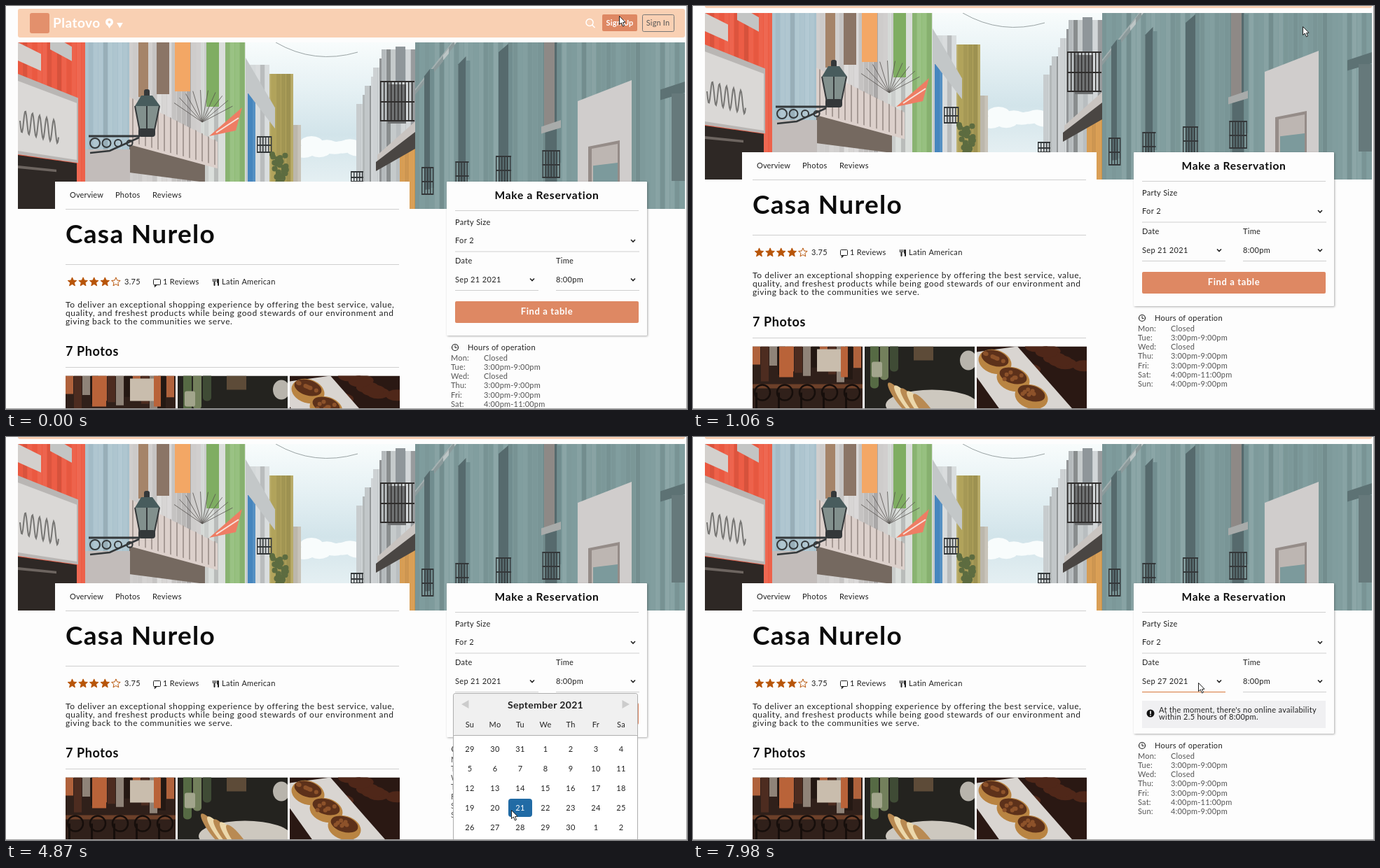
An HTML page with a canvas for the animation above (8000 ms loop, 972x576 px).

```html
<!DOCTYPE html>
<html lang="en">
<head>
<meta charset="utf-8">
<title>Restaurant page</title>
<style>
html, body { margin: 0; width: 100%; height: 100%; overflow: hidden; background: #fdfdfd; }
canvas { display: block; }
</style>
</head>
<body>
<canvas id="stage" width="972" height="576"></canvas>
<script>
const ctx = document.getElementById('stage').getContext('2d');
const LOOP = 8000;
const ORANGE = '#de8863', HOVER = '#d8783a', RULE = '#cfcfcf', INK = '#222', IRON = '#34383a';
const WHITE_BOLD = { weight: 700, color: '#fff', align: 'center' };

// ---------- helpers ----------
const noise = n => { const v = Math.sin(n * 12.9898) * 43758.5453; return v - Math.floor(v); };
const times = (n, f) => Array.from({ length: n }, (_, i) => f(i));

function rect(color, x, y, w, h, r = 0) {
  ctx.fillStyle = color;
  ctx.beginPath();
  ctx.roundRect(x, y, w, h, r);
  ctx.fill();
}

function frame(color, x, y, w, h, r) {
  ctx.strokeStyle = color;
  ctx.lineWidth = 1;
  ctx.beginPath();
  ctx.roundRect(x, y, w, h, r);
  ctx.stroke();
}

function trace(points) {
  ctx.beginPath();
  points.forEach(p => ctx.lineTo(...p));
}

function poly(color, ...points) {
  trace(points);
  ctx.fillStyle = color;
  ctx.fill();
}

function line(color, width, ...points) {
  trace(points);
  ctx.strokeStyle = color;
  ctx.lineWidth = width;
  ctx.stroke();
}

function disc(color, x, y, rx, ry = rx, turn = 0) {
  ctx.fillStyle = color;
  ctx.beginPath();
  ctx.ellipse(x, y, rx, ry, turn, 0, 7);
  ctx.fill();
}

function ring(color, x, y, r, width = 1) {
  ctx.strokeStyle = color;
  ctx.lineWidth = width;
  ctx.beginPath();
  ctx.arc(x, y, r, 0, 7);
  ctx.stroke();
}

function arrow(color, x, y, size, turn) {
  poly(color, ...times(3, i => {
    const a = turn + i * Math.PI * 2 / 3;
    return [x + size * Math.cos(a), y + size * Math.sin(a)];
  }));
}

function text(s, x, y, { size = 11, weight = 400, color = INK, gap = 0.3, align = 'left' } = {}) {
  ctx.font = `${weight} ${size}px Lato, "Open Sans", sans-serif`;
  ctx.letterSpacing = gap + 'px';
  ctx.textAlign = align;
  ctx.fillStyle = color;
  ctx.fillText(s, x, y);
}

const rule = (x1, x2, y, color = RULE) => rect(color, x1, y, x2 - x1, 1);
const chevron = (x, y) => line(INK, 1.6, [x - 3, y - 1.5], [x, y + 1.5], [x + 3, y - 1.5]);

function clipped(x, y, w, h, draw) {
  ctx.save();
  ctx.beginPath();
  ctx.rect(x, y, w, h);
  ctx.clip();
  draw();
  ctx.restore();
}

// ---------- motion ----------
// pointer moves: start, end, x, y, sideways bend
const MOVES = [
  [500, 800, 870, 29, 0],
  [1480, 2200, 706, 292, 0],
  [3510, 3750, 696, 357, 0],
  [4300, 4990, 697, 555, 70],
  [6090, 6780, 738, 388, 46],
  [7660, 7980, 721, 351, 0]
];

const progress = (t, from, to) => Math.min(1, Math.max(0, (t - from) / (to - from)));

function pointerAt(t) {
  const tip = { x: 875, y: 14 };
  for (const [from, to, x, y, bend] of MOVES) {
    const e = 1 - (1 - progress(t, from, to)) ** 1.25;
    tip.x += (x - tip.x) * e + bend * Math.sin(Math.PI * e);
    tip.y += (y - tip.y) * e;
  }
  return tip;
}

const scrollAt = t => Math.round(42 * (1 - (1 - progress(t, 490, 820)) ** 2));
const over = (p, x, y, w, h) => p.x >= x && p.x <= x + w && p.y >= y && p.y <= y + h;

// ---------- header ----------
function drawHeader() {
  rect('#f9d0b3', 17, 4, 952, 41, 3);
  rect('#e3906c', 34, 10, 28, 29, 3);
  text('Platovo', 67, 31, { size: 19, weight: 700, color: '#fff', gap: 0.5 });
  disc('#fff', 147.5, 23, 5.5);
  arrow('#fff', 147.5, 27, 5, Math.PI / 2);
  disc('#f9d0b3', 147.5, 23, 2);
  arrow('#fff', 162.5, 26.5, 5, Math.PI / 2);
  ring('#fff', 833, 23.5, 5, 1.5);
  line('#fff', 1.6, [836.5, 27], [840.5, 31]);
  rect(ORANGE, 851, 12, 50, 24, 2);
  text('Sign Up', 876, 28, { ...WHITE_BOLD, gap: 0.2 });
  frame('#777', 908.5, 12.5, 45, 24, 2);
  text('Sign In', 930.5, 28, { color: '#555', gap: 0.15, align: 'center' });
}

// ---------- street ----------
const TOP = 52, BASE = 290, VANISH = { x: 460, y: 275 };

// wall with faint vertical pilasters
function wall(color, x, w, top = TOP, grain = 0.16) {
  rect(color, x, top, w, BASE - top);
  for (let dx = 0; dx < w; dx += 7) {
    const n = noise(x + dx) - 0.5, shade = n > 0 ? '255,255,255' : '0,0,0';
    rect(`rgba(${shade},${Math.abs(n) * 2 * grain})`, x + dx, top, Math.min(6, w - dx), BASE - top);
  }
}

// band whose edges recede to the vanishing point
function slab(color, x1, x2, top, bottom) {
  const k = (x2 - VANISH.x) / (x1 - VANISH.x);
  const far = y => VANISH.y + (y - VANISH.y) * k;
  poly(color, [x1, top], [x2, far(top)], [x2, far(bottom)], [x1, bottom]);
}

function railing(x, y, w, h, color = IRON, step = 4) {
  for (let dx = 0; dx <= w; dx += step) rect(color, x + dx, y, 1.4, h);
  for (const dy of [0, h / 2, h - 2]) rect(color, x, y + dy, w, 2);
}

function drawSky() {
  const g = ctx.createLinearGradient(0, TOP, 0, 250);
  ['#f8fcfc', '#e6f1f4', '#d2e4ea', '#e4eff2'].forEach((c, i) => g.addColorStop(i / 3, c));
  rect(g, 340, TOP, 250, 200);
  times(9, i => disc('#f8fcfc', 425 + i * 11, 208 - noise(i) * 14, 16, 9));
  ctx.strokeStyle = '#9aa3a4';
  ctx.lineWidth = 1;
  ctx.beginPath();
  ctx.moveTo(385, TOP);
  ctx.quadraticCurveTo(440, 84, 502, 66);
  ctx.stroke();
}

function drawLeftStreet() {
  wall('#c4bfb4', 403, 18, 170);
  wall('#b2a45c', 372, 38, 97);
  wall('#d3d7d8', 342, 34, 84);
  wall('#4585bd', 345, 11, 125);
  slab('#c3c7c8', 342, 384, 74, 120);
  railing(358, 186, 20, 24);
  times(24, i => disc('#5d6c40', 380 + noise(i) * 20, 212 + i * 1.7, 4));

  wall('#d9ddda', 276, 66);
  wall('#8fbb76', 313, 28);
  rect('#7fad62', 286, TOP, 18, 92);
  wall('#d0cecd', 174, 104, TOP, 0.3);
  ['#a58469', '#8b7566', '#f3a765'].forEach((c, i) => rect(c, 189 + i * 26, TOP, 14 + i * 4, 78 - i * 4));

  slab('#756960', 176, 284, 194, 238);
  slab('#dcd0cb', 176, 302, 130, 198);
  for (let x = 180; x < 300; x += 9) slab('#a69a95', x, x + 2, 130 + (x - 176) * 0.5, 194 + (x - 176) * 0.27);
  times(10, i => {
    const a = -2.5 + i * 0.22;
    line('#56524f', 0.8, [280, 166], [280 + 50 * Math.cos(a), 166 + 46 * Math.sin(a)]);
  });

  wall('#a8c1cc', 111, 65);
  rect('#c2bcba', 111, 205, 66, 48);
  wall('#ec5a42', 17, 96, TOP, 0.1);
  slab('#d3d0cd', 17, 50, TOP, 78);
  slab('#c3c5c4', 63, 94, 40, 62);
  slab('#b9b6b4', 17, 103, 97, 212);
  slab('#dad8d6', 17, 101, 107, 207);
  slab('#2e2825', 17, 101, 213, BASE + 9);
  slab('#6d6560', 17, 72, 228, 232);
  trace(times(56, i => [20 + i, 164 + i * 0.3 + 16 * Math.sin(i * 0.62)]));
  ctx.strokeStyle = '#777674';
  ctx.lineWidth = 2;
  ctx.stroke();

  poly('#ee7d64', [290, 186], [337, 145], [328, 178]);
  line('#f6e4dd', 2, [300, 181], [332, 160]);
  drawLamp();
}

function drawLamp() {
  line(IRON, 3, [118, 186], [191, 186]);
  line(IRON, 2.5, [120, 210], [148, 207], [190, 188]);
  times(4, i => ring(IRON, 127 + i * 16.5, 196, 7 - i, 2));
  rect(IRON, 197, 119, 8, 12, 3);
  poly('#485c5d', [184, 143], [193, 128], [209, 128], [220, 143]);
  poly('#82908d', [184, 143], [219, 143], [212, 176], [190, 176]);
  for (const x of [184, 201, 219]) line(IRON, 2, [x, 143], [201 + (x - 201) * 0.6, 178]);
  rect(IRON, 189, 175, 24, 12, 4);
}

function drawRightStreet() {
  // ornate white house, stepping back towards the end of the street
  times(7, i => wall('#c3c8ca', 500 + i * 6 + (i % 2) * 3, 90 - i * 6, 140 - i * 13, 0.3));
  rect('#8f969a', 556, 58, 14, 50);
  wall('#dda257', 562, 22, 196);
  railing(492, 236, 18, 16);
  rect('#6f7172', 545, 112, 26, 56);
  railing(534, 107, 49, 58, '#2f2d2c', 5);
  slab('#c9c4c0', 584, 530, 165, 182);
  slab('#4a4643', 584, 528, 180, 204);

  wall('#7f9c9d', 584, 385, TOP, 0.1);
  times(4, i => slab(i % 2 ? '#8b9a9b' : '#bcc5c5', 648 - i * 8, 584, 38 + i * 11, 46 + i * 11));
  times(4, i => {
    const x = 597 + 44 * i + 4.5 * i * i, w = 8 + i * 3;
    slab('#566a6d', x + w, x, 90 - i * 18, 262);
    rect('#718d8f', x + w, 90 - i * 12, 6, 170);
    railing(x - 4, 230 - i * 8, w + 8, 40);
  });
  rect('#8e8986', 768, TOP, 15, 120);
  slab('#a8abaa', 792, 764, 163, 174);
  slab('#d0cdcc', 893, 816, 106, 262);
  slab('#958c88', 876, 831, 192, 264);
  slab('#bdb6b2', 873, 836, 197, 264);
  slab('#7c9a9c', 873, 838, 224, 264);
  slab('#5d7274', 969, 934, 108, 124);
  rect('#66797b', 950, 125, 19, 125);
}

// ---------- photos ----------
const PHOTO = { y: 528.5, w: 157, h: 100 };

function photo(x, base, draw) {
  clipped(x, PHOTO.y, PHOTO.w, PHOTO.h, () => {
    ctx.translate(x, PHOTO.y);
    rect(base, 0, 0, PHOTO.w, PHOTO.h);
    draw();
  });
}

function drawPhotos() {
  photo(85, '#30201a', () => {
    times(13, i => rect(['#b0623c', '#4d2c20', '#8f8378', '#241813'][i % 4], i * 12, 0, 11, 26 + noise(i) * 26));
    rect('#c9bdad', 92, 4, 34, 32);
    for (const x of [38, 48, 126]) rect('#b96339', x, 0, 10, 44);
    rect('#6d4029', 0, 54, PHOTO.w, 6);
    times(5, i => {
      ring('#160e0b', 14 + i * 32, 66, 11, 2.5);
      rect('#160e0b', 4 + i * 32, 66, 3, 34);
    });
  });
  photo(245, '#24231f', () => {
    times(3, i => rect(['#566a44', '#73805c', '#3f4b35'][i], 8 + i * 14, -4, 12, 64 - i * 12, 5));
    rect('#a2a58c', 10, 22, 15, 22, 3);
    rect('#5d4b38', 70, 0, 28, 20);
    disc('#cdc8bf', 96, 84, 66, 22);
    disc('#b8b4ac', 148, 20, 12, 14);
    times(5, i => disc(i % 2 ? '#ecd8ab' : '#b98a52', 52 + i * 9, 76 + i * 4, 7, 30, -0.65));
  });
  photo(405, '#2a1813', () => {
    times(10, i => disc('#4f2719', 70 + noise(i) * 90, noise(i + 20) * 50, 16, 8));
    poly('#d9d5d1', [0, 8], [58, 0], [146, 100], [40, 100], [0, 44]);
    times(3, i => {
      const x = 26 + i * 26, y = 18 + i * 25;
      disc('#b98442', x, y + 4, 24, 17, 0.3);
      disc('#5d311a', x, y - 1, 20, 11, 0.3);
      times(7, k => disc('#8d522a', x + (noise(k + i) - 0.5) * 28, y - 2 + (noise(k + 9 * i) - 0.5) * 12, 3));
    });
  });
}

// ---------- details ----------
function star(x, y, filled) {
  trace(times(10, i => {
    const a = -Math.PI / 2 + i * Math.PI / 5, r = i % 2 ? 3 : 6.6;
    return [x + r * Math.cos(a), y + r * Math.sin(a)];
  }));
  ctx.closePath();
  ctx.fillStyle = ctx.strokeStyle = '#b85509';
  ctx.lineWidth = 1;
  if (filled) ctx.fill();
  ctx.stroke();
}

function drawDetails() {
  rect('#fdfdfd', 70, 251, 506, 380);
  text('Overview', 91, 274, { gap: 0.15 });
  text('Photos', 156, 274);
  text('Reviews', 209, 274);
  text('Casa Nurelo', 85, 339, { size: 37, weight: 700, color: '#0c0c0c', gap: 1.3 });
  for (const y of [290, 369, 516]) rule(85, 561, y);

  times(5, i => star(94.5 + i * 15.6, 394.5, i < 4));
  text('3.75', 169, 398);
  frame(INK, 210.5, 390.5, 10, 8, 1);
  line(INK, 1.2, [212.5, 398], [212.5, 401], [215, 398.5]);
  text('1 Reviews', 224, 398);
  for (const x of [295, 297, 299]) rect(INK, x, 390, 1, 4);
  for (const x of [296.5, 302]) rect(INK, x, 393, 2, 7, 1);
  rect(INK, 301, 390, 3, 6, 1);
  text('Latin American', 308, 398);

  [
    'To deliver an exceptional shopping experience by offering the best service, value,',
    'quality, and freshest products while being good stewards of our environment and',
    'giving back to the communities we serve.'
  ].forEach((s, i) => text(s, 85, 431 + i * 12, { size: 12, gap: 0.55 }));
  text('7 Photos', 85, 500, { size: 18, weight: 700, color: '#0c0c0c', gap: 0.6 });
  drawPhotos();
}

function field(label, value, x, y, w, tip) {
  text(label, x, y);
  text(value, x, y + 26.5, { gap: 0.35 });
  chevron(x + w - 9, y + 23);
  rule(x, x + w, y + 38, over(tip, x, y + 10, w, 28) ? HOVER : RULE);
}

function drawBooking(t, tip) {
  const full = t >= 7080;
  ctx.save();
  ctx.shadowColor = 'rgba(0,0,0,.32)';
  ctx.shadowBlur = 3;
  ctx.shadowOffsetX = ctx.shadowOffsetY = 1;
  rect('#fdfdfd', 629, 251, 286, full ? 215 : 220, 1);
  ctx.restore();

  text('Make a Reservation', 772, 276, { size: 15.5, weight: 700, color: '#0c0c0c', gap: 0.75, align: 'center' });
  rule(641, 903, 292);
  field('Party Size', 'For 2', 641, 312.5, 263, tip);
  field('Date', t < 5430 ? 'Sep 21 2021' : 'Sep 27 2021', 641, 368, 119, tip);
  field('Time', '8:00pm', 785, 368, 119, tip);

  if (full) {
    rect('#f0f0f2', 641, 419, 262, 39);
    disc('#111', 653, 437, 5.5);
    rect('#fff', 652.2, 433.5, 1.6, 4.5);
    rect('#fff', 652.2, 439, 1.6, 1.6);
    text("At the moment, there's no online availability", 665, 436);
    text('within 2.5 hours of 8:00pm.', 665, 446);
  } else {
    rect(over(tip, 641, 422, 262, 31) ? '#d67b54' : ORANGE, 641, 422, 262, 31, 2);
    text('Find a table', 772, 441, { ...WHITE_BOLD, size: 13, gap: 0.6 });
  }
  drawHours(full ? -5 : 0);
}

function drawHours(dy) {
  ring(INK, 641, 488 + dy, 4.5, 1.2);
  line(INK, 1, [641, 485 + dy], [641, 488.5 + dy], [643.5, 488.5 + dy]);
  text('Hours of operation', 659, 491.5 + dy);
  const week = {
    Mon: 'Closed', Tue: '3:00pm-9:00pm', Wed: 'Closed', Thu: '3:00pm-9:00pm',
    Fri: '3:00pm-9:00pm', Sat: '4:00pm-11:00pm', Sun: '4:00pm-9:00pm'
  };
  Object.entries(week).forEach(([day, hours], i) => {
    const y = 506.5 + i * 13.25 + dy;
    text(day + ':', 635, y, { color: '#555', gap: 0.2 });
    text(hours, 682, y, { color: '#555', gap: 0.2 });
  });
}

// ---------- popups ----------
function drawSizeList() {
  rect('#111', 638, 312.5, 302, 224.5, 2);
  rect('#fff', 639, 313.5, 300, 222.5, 1);
  clipped(639, 314, 300, 222, () => {
    times(9, i => text('For ' + (i + 2), 645, 329.5 + i * 26.15, { size: 12, color: '#757575', gap: 0.25 }));
    rect('#f1f1f1', 923, 314, 16, 222);
    rect('#c1c1c1', 925, 330, 13, 148);
    arrow('#888', 931, 323.5, 4, -Math.PI / 2);
    arrow('#444', 931, 526.5, 4, Math.PI / 2);
  });
}

function drawCalendar(tip) {
  const left = 644, top = 432, colW = 36, rowH = 28;
  const center = { align: 'center' };
  rect('#aeaeae', 638, 366, 264, 230, 4);
  rect('#fff', 639, 367, 262, 228, 3);
  rect('#f0f0f0', 639, 367, 262, 59, 3);
  rule(639, 901, 426, '#aeaeae');
  arrow('#ccc', 657, 382, 7, Math.PI);
  arrow('#ccc', 883, 382, 7, 0);
  text('September 2021', 770, 388, { size: 14, weight: 700, ...center });
  ['Su', 'Mo', 'Tu', 'We', 'Th', 'Fr', 'Sa'].forEach((d, c) => text(d, left + colW * (c + 0.5), 415, center));
  times(42, i => {
    const day = new Date(2021, 7, 29 + i).getDate();
    const x = left + (i % 7) * colW, y = top + Math.floor(i / 7) * rowH;
    const picked = day === 21;
    if (picked) rect('#216ba5', x + 1, y + 1, 34, 26, 4);
    else if (over(tip, x, y, colW, rowH)) rect('#f0f0f0', x + 1, y + 1, 34, 26, 4);
    text(day, x + colW / 2, y + 18, { color: picked ? '#fff' : INK, ...center });
  });
}

function drawPointer({ x, y }, t) {
  if (t > 3600 && t < 4400 && over({ x, y }, 641, 340, 71, 24)) {
    rect('#111', x, y - 6, 1, 12);
    for (const dy of [-6, 5]) rect('#111', x - 3, y + dy, 7, 1);
    return;
  }
  ctx.save();
  ctx.translate(Math.round(x) + 0.5, Math.round(y) + 0.5);
  trace([[0, 0], [0, 12], [2.8, 9.5], [5, 14.5], [7, 13.5], [5, 9], [8.5, 8.7]]);
  ctx.closePath();
  ctx.fillStyle = '#fff';
  ctx.fill();
  ctx.strokeStyle = INK;
  ctx.lineWidth = 1;
  ctx.stroke();
  ctx.restore();
}

// ---------- loop ----------
function draw() {
  const t = performance.now() % LOOP;
  const tip = pointerAt(t), scroll = scrollAt(t);
  rect('#fdfdfd', 0, 0, 972, 576);
  ctx.save();
  ctx.translate(0, -scroll);
  drawHeader();
  clipped(17, TOP, 952, BASE - TOP, () => {
    drawSky();
    drawLeftStreet();
    drawRightStreet();
  });
  drawDetails();
  drawBooking(t, { x: tip.x, y: tip.y + scroll });
  ctx.restore();
  if (t >= 2420 && t < 3200) drawSizeList();
  if (t >= 4110 && t < 5430) drawCalendar(tip);
  rect('#a2a2a2', 0, 575, 972, 1);
  rect('#a2a2a2', 971, 0, 1, 576);
  drawPointer(tip, t);
  requestAnimationFrame(draw);
}
draw();
</script>
</body>
</html>
```
